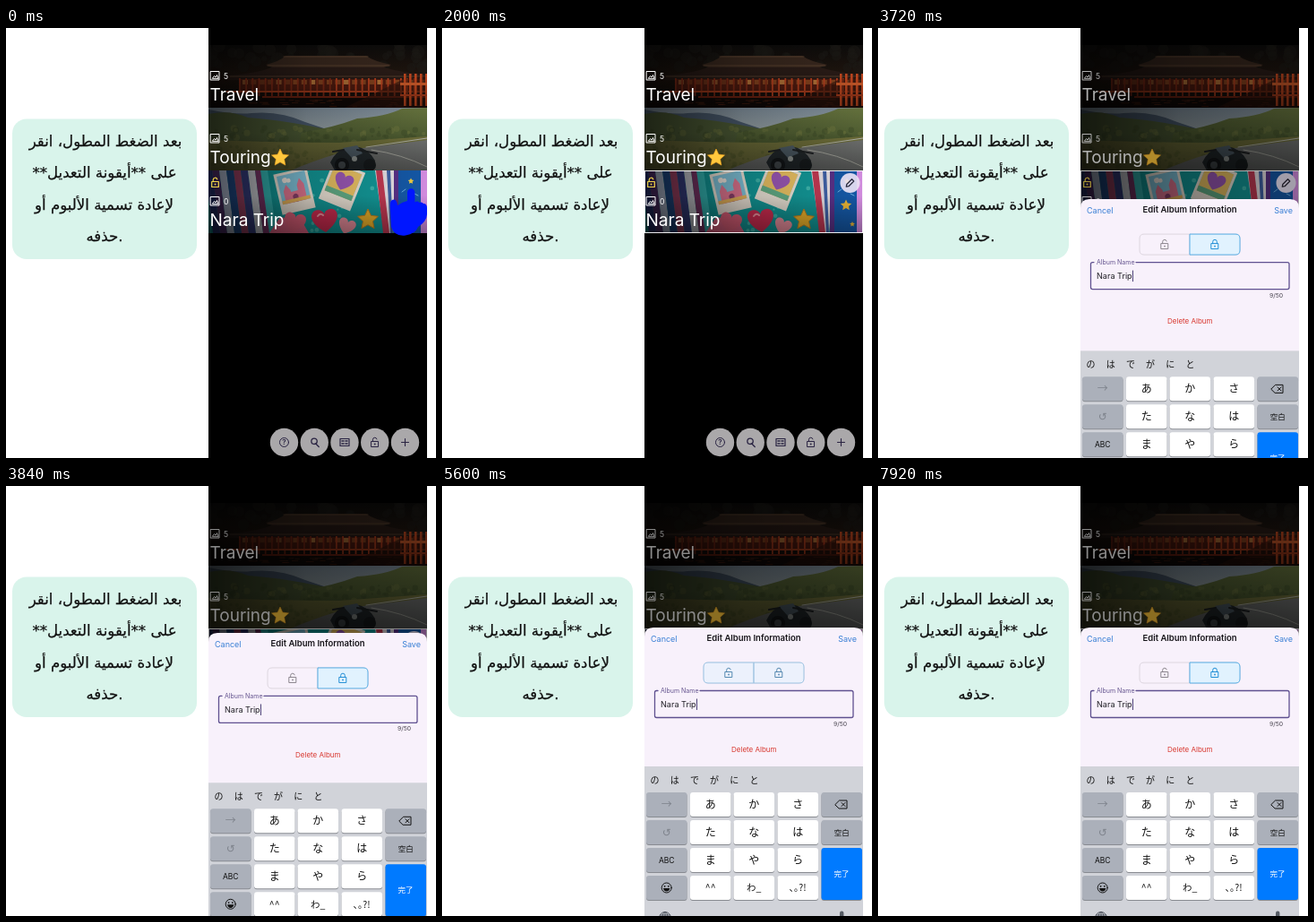
An HTML page that plays this animation: 480 px wide and 480 px high, repeating every 8000 ms.

```html
<!DOCTYPE html>
<html lang="ar">
<head>
<meta charset="utf-8">
<title>Album editing guide</title>
<style>
html, body { margin: 0; width: 100%; height: 100%; overflow: hidden; background: #fff; }
svg { display: block; width: 480px; height: 480px; font-family: Inter, Roboto, sans-serif; }
.note { font: 16.6px "DejaVu Sans", "Noto Sans", sans-serif; fill: #111; stroke: #111; stroke-width: .25; text-anchor: middle; }
.jp { font-family: "Noto Sans CJK JP", "Noto Sans CJK", "Noto Sans", sans-serif; }
.mid { text-anchor: middle; }
.line { fill: none; stroke-linecap: round; stroke-linejoin: round; }
</style>
</head>
<body>
<svg id="stage" viewBox="0 0 480 480" xmlns="http://www.w3.org/2000/svg"></svg>
<script>
const LOOP = 8000;
let seed = 11;
const rnd = () => (seed = (seed * 16807) % 2147483647) / 2147483647;
const many = (n, f) => Array.from({ length: n }, (_, i) => f(i)).join('');
const rect = (x, y, w, h, fill, more = '') =>
  `<rect x="${x}" y="${y}" width="${w}" height="${h}" fill="${fill}" ${more}/>`;
const path = (d, fill, more = '') => `<path d="${d}" fill="${fill}" ${more}/>`;
const line = (d, color, w = 1, more = '') =>
  `<path class="line" d="${d}" stroke="${color}" stroke-width="${w}" ${more}/>`;
const circle = (x, y, r, fill, more = '') =>
  `<circle cx="${x}" cy="${y}" r="${r}" fill="${fill}" ${more}/>`;
const text = (x, y, size, fill, s, more = '') =>
  `<text x="${x}" y="${y}" font-size="${size}" fill="${fill}" ${more}>${s}</text>`;
const group = (more, s) => `<g ${more}>${s}</g>`;

function star(x, y, r, fill, more = '') {
  const pts = many(10, i => {
    const a = i * Math.PI / 5 - Math.PI / 2, q = i % 2 ? r * .48 : r;
    return `${(x + q * Math.cos(a)).toFixed(1)},${(y + q * Math.sin(a)).toFixed(1)} `;
  });
  return `<polygon points="${pts}" fill="${fill}" stroke-linejoin="round" ${more}/>`;
}
const heart = (x, y, s, fill, turn = 0) => path(
  'M0 8C-14 -1 -10 -9 -5 -9C-2 -9 0 -7 0 -5C0 -7 2 -9 5 -9C10 -9 14 -1 0 8Z', fill,
  `transform="translate(${x} ${y}) rotate(${turn}) scale(${s})"`);

function lock(x, y, color, open, w = 1) {
  const shackle = open ? 'M-2.3 -1V-3.2A2.3 2.3 0 0 1 2.2 -3.6' : 'M-2.3 -1V-3A2.3 2.3 0 0 1 2.3 -3V-1';
  return group(`transform="translate(${x} ${y})"`,
    line(`M-3.8 -1H3.8V5H-3.8Z${shackle}`, color, w) + circle(0, 2, .9, color));
}

const gradient = (id, stops, dir = 'x2="0" y2="1"') => `<linearGradient id="${id}" x1="0" y1="0" ${dir}>` +
  stops.map(([o, c, a = 1]) => `<stop offset="${o}" stop-color="${c}" stop-opacity="${a}"/>`).join('') +
  '</linearGradient>';

const defs = '<defs>' +
  gradient('night', [[0, '#0d0c0b'], [.5, '#21160f'], [1, '#120b08']]) +
  gradient('sky', [[0, '#7c8b98'], [.5, '#a0aaa9']]) +
  gradient('hill', [[0, '#66733e'], [1, '#41502a']]) +
  gradient('shade', [[0, '#000', .6], [.45, '#000', .22], [1, '#000', .02]], 'x2="1" y2="0"') +
  gradient('low', [[.4, '#000', 0], [1, '#000', .35]]) +
  '<clipPath id="row"><rect width="244" height="70"/></clipPath>' +
  '<clipPath id="phone"><rect x="226" width="244" height="480"/></clipPath></defs>';

function shrine() {
  return rect(0, 0, 244, 70, 'url(#night)') +
    many(45, () => circle(rnd() * 244, rnd() * 25, 3 + rnd() * 5, '#1b1a15', 'opacity=".5"')) +
    path('M64 22Q80 18 86 12H176Q184 18 204 22L190 27H76Z', '#39281e') +
    path('M20 34Q54 32 70 25H196Q216 31 244 33V39H20Z', '#2a1c17') +
    line('M84 13H178M66 23H202M24 35H244', '#58402e', 1) +
    rect(34, 38, 210, 14, '#571d10') +
    many(22, i => rect(38 + i * 9.4, 39, 6, 5, i % 4 ? '#9a5124' : '#d58d45', `opacity="${i < 6 ? .5 : .85}"`)) +
    many(30, i => rect(34 + i * 7.2, 37, 1.8, 20, i > 14 ? '#c54521' : '#8e2f18')) +
    rect(20, 51, 224, 2, '#b9431f') + rect(60, 57, 184, 2, '#852813') +
    rect(0, 60, 244, 10, '#140b08') +
    many(34, () => rect(40 + rnd() * 200, 60 + rnd() * 8, 3 + rnd() * 7, .8, '#74301a', 'opacity=".6"')) +
    path('M152 70L218 38L244 34V70Z', '#35150d', 'opacity=".6"') +
    many(5, i => rect(218 + i * 6, 32, 2.6, 36, '#c94a20')) +
    rect(214, 42, 30, 3, '#d7602c') + rect(214, 55, 30, 2, '#b2401d');
}

function road() {
  return rect(0, 0, 244, 70, 'url(#sky)') +
    path('M0 2Q30 8 48 6Q80 3 108 16L150 30V60H0Z', '#48586a') +
    path('M0 7Q24 2 44 11Q88 14 150 28V70H0Z', '#4c5a35') +
    path('M104 28Q140 22 166 12Q198 10 216 1L244 0V50H98Z', 'url(#hill)') +
    many(110, () => circle(rnd() * 244, 22 + rnd() * 24, 1 + rnd() * 3, rnd() > .5 ? '#3e4b27' : '#6d753d', 'opacity=".5"')) +
    path('M0 36Q80 39 146 39L244 32V70H0Z', '#71713b') +
    many(60, () => circle(rnd() * 150, 42 + rnd() * 26, 1 + rnd() * 2, '#585f2e', 'opacity=".5"')) +
    path('M92 70Q144 48 180 44L244 36V70Z', '#737573') +
    line('M182 47Q216 52 244 66M176 44L244 34', '#b7b8ae', 1) +
    path('M136 61Q143 47 152 46L164 43Q178 45 186 59L184 70H141Z', '#252c2f') +
    path('M150 45L166 42L172 51L160 56Z', '#52616b') +
    line('M139 49L151 47M166 47L188 51', '#202426', 2) +
    circle(149, 64, 8, '#15191b') + circle(180, 64, 7, '#1b2022') +
    circle(149, 64, 4, '#4c5357') + circle(163, 57, 3, '#a1a7a3');
}

function polaroid(x, y, turn, inner) {
  return group(`transform="translate(${x} ${y}) rotate(${turn})"`,
    rect(-19, -23, 38, 46, '#f2e9dc') + rect(-16, -20, 32, 32, '#83c8df') + inner);
}

function scrapbook() {
  const spines = ['#293477', '#553271', '#bac5dc', '#214d8c', '#a64569', '#383f82', '#d0d1d8', '#7b3568'];
  const castle = path('M-12 12V-2L-8 -9L-4 -2V0H4V-6L8 -13L12 -6V12Z', '#e77994') +
    path('M-3 12V5Q0 1 3 5V12Z', '#8e416d') + rect(-16, 8, 32, 4, '#edb85c') +
    circle(-8, -14, 3, '#f7eee5') + circle(-4, -13, 2.4, '#f7eee5');
  const balloon = rect(-16, -20, 32, 32, '#f1c766') + heart(0, -4, 1.1, '#a05bbb') +
    rect(-16, 6, 32, 6, '#65b18a');
  return rect(0, 0, 244, 70, '#139b9b') +
    many(8, i => path(`M${i * 8 - 4} 0H${i * 8 + 4}L${i * 8 + 13} 70H${i * 8 + 5}Z`, spines[i])) +
    path('M58 0H66L76 70H68Z', '#35bbb9') +
    many(18, () => circle(80 + rnd() * 110, rnd() * 70, 1 + rnd() * 2, '#54c9bc', 'opacity=".7"')) +
    path('M68 70L80 52L104 56L112 70Z', '#e66686') +
    polaroid(96, 23, -13, castle) + polaroid(149, 17, 22, balloon) +
    heart(130, 57, 1.5, '#d92f55', -5) + heart(96, 59, 1.25, '#eb6681', 12) + heart(154, 63, 1, '#f495a4', 20) +
    line('M122 51Q125 47 128 50', '#ff9eac', 2) +
    star(178, 55, 12, '#f3b72b', 'stroke="#ca851d" stroke-width="1"') +
    path('M186 0H212L206 70H196Z', '#e8e2e6') +
    path('M187 0H194L202 70H195Z', '#c43a54') +
    path('M199 0H203L206 70H203Z', '#3f62a8') + path('M207 0H214V70H207Z', '#5a3189') +
    rect(212, 0, 27, 70, '#1559a8') + rect(237, 0, 7, 70, '#d58ee2') +
    star(226, 12, 3.5, '#f2ce42') + star(225, 39, 6.5, '#f0ba37') + star(232, 60, 3, '#f0ba37') +
    line('M216 24L220 21M230 26L234 28', '#70b3e4', 1);
}

function row(y, art, title, count) {
  const icon = line('M2.5 29.5H12V39H2.5ZM4.5 37L6.5 34.5L8 36L9.5 33.5L11 37Z', '#fff', 1);
  return group(`transform="translate(226 ${y})"`,
    group('clip-path="url(#row)"', art + rect(0, 0, 244, 70, 'url(#shade)') + rect(0, 0, 244, 70, 'url(#low)')) +
    icon + text(17, 37.5, 8.5, '#fff', count) +
    text(1.5, 62, 19, '#fff', title));
}

function buttons() {
  const ink = '#292342';
  const icons = [
    `<circle class="line" r="5" stroke="${ink}"/>` + text(0, 2.8, 8, ink, '?', 'class="mid" font-weight="600"'),
    line('M2 2L5 5M3 -1.2A3.2 3.2 0 1 1 -3.4 -1.2A3.2 3.2 0 1 1 3 -1.2', ink, 1.3),
    line('M-5 -4H5V4H-5Z', ink, 1.2) + line('M-3 -1.5H-1M1 -1.5H3M-3 1.5H-1M1 1.5H3', ink, 1.6),
    lock(0, 0, ink, true),
    line('M-4 0H4M0 -4V4', ink, 1.1)
  ];
  return icons.map((s, i) => group(`transform="translate(${310.5 + i * 33.75} 462.5)"`,
    circle(0, 0, 15.7, '#aaa8aa') + s)).join('');
}

function keyboard() {
  const xs = [228, 277, 325.5, 374.5, 423.5];
  const keys = [
    ['→', 'あ', 'か', 'さ', ''],
    ['↺', 'た', 'な', 'は', '空白'],
    ['ABC', 'ま', 'や', 'ら', ''],
    ['', '^^', 'わ_', '､｡?!', '']
  ];
  const key = (x, y, h, fill) => rect(x, y + 1, 45.5, h, '#888b91', 'rx="3"') + rect(x, y, 45.5, h, fill, 'rx="3"');
  let s = rect(226, 313, 244, 230, '#d1d3d9');
  [...'のはでがにと'].forEach((c, i) => s += text(237.5 + i * 22.2, 332, 10, '#111', c, 'class="jp mid"'));
  keys.forEach((cells, r) => cells.forEach((c, k) => {
    if (k === 4 && r > 1) return;
    const y = 342 + r * 31, side = k === 0 || k === 4;
    const size = side ? (k === 4 ? 8.5 : c === 'ABC' ? 8.5 : 12) : r === 3 ? 10.5 : 12;
    const ink = k === 0 && r < 2 ? '#7f848d' : '#111';
    s += key(xs[k], y, 27, side ? '#abb0ba' : '#fff') +
      text(xs[k] + 22.7, y + 13.5 + size * .36, size, ink, c, c === 'ABC' ? 'class="mid"' : 'class="jp mid"');
  }));
  s += key(423.5, 404, 58, '#007aff') + text(446, 436, 8.5, '#fff', '完了', 'class="jp mid"');
  s += line('M439 355.5L443.5 351H452V360H443.5ZM446 353.5L450 357.5M450 353.5L446 357.5', '#111', 1);
  s += `<circle class="line" cx="250.7" cy="448.5" r="5.5" stroke="#111"/>` +
    circle(248.6, 446.8, .9, '#111') + circle(252.8, 446.8, .9, '#111') +
    path('M247 449H254.4Q253.6 452.6 250.7 452.6T247 449Z', '#111');
  s += line('M242.5 482A6.5 6.5 0 0 1 255.5 482M246 482Q246 476 249 475.5Q252 476 252 482M249 475.5V482M243.5 479H254.5', '#444b55', .9);
  s += rect(444, 474.5, 4.4, 9, '#555b64', 'rx="2.2"');
  return s;
}

function choice(id, x, side) {
  const left = side === 'left';
  const shape = left ? `M${x + 56} 197H${x + 5}Q${x} 197 ${x} 202V215Q${x} 220 ${x + 5} 220H${x + 56}Z`
    : `M${x} 197H${x + 51}Q${x + 56} 197 ${x + 56} 202V215Q${x + 56} 220 ${x + 51} 220H${x}Z`;
  return path(shape, 'none', 'stroke="#ddd6df" stroke-width="1"') + lock(x + 28, 208.5, '#8b858d', left) +
    group(`id="${id}"`, path(shape, '#e1f2fe', 'stroke="#58aee5" stroke-width="1"') + lock(x + 28, 208.5, '#238fd6', left));
}

function sheet() {
  return path('M226 560V168Q226 158 236 158H460Q470 158 470 168V560Z', '#f8f1fb') +
    text(233, 174, 9, '#397fd5', 'Cancel') +
    text(348, 173, 9.5, '#17151a', 'Edit Album Information', 'class="mid" font-weight="600"') +
    text(463, 174, 9, '#397fd5', 'Save', 'text-anchor="end"') +
    choice('open', 292, 'left') + choice('closed', 348, 'right') +
    line('M241 228.5H239.5Q237.5 228.5 237.5 230.5V256.5Q237.5 258.5 239.5 258.5H457Q459 258.5 459 256.5V230.5Q459 228.5 457 228.5H288', '#5f5090', 1.3) +
    text(244, 231.3, 7, '#65558f', 'Album Name') +
    text(244, 247, 9.1, '#222027', 'Nara Trip') +
    rect(284, 237.5, 1, 12.5, '#4c4177') +
    text(452, 267.5, 6.8, '#49454f', '9/50', 'text-anchor="end"') +
    text(348.3, 297.3, 8, '#d8382f', 'Delete Album', 'class="mid"');
}

const note = [
  ['بعد الضغط المطول، انقر', 111, 'rtl'],
  ['على **أيقونة التعديل**', 110, 'rtl'],
  ['لإعادة تسمية الألبوم أو', 109.5, 'rtl'],
  ['حذفه.', 110, 'ltr']
].map(([s, x, dir], i) => `<text class="note" x="${x}" y="${132 + i * 35.3}" direction="${dir}">${s}</text>`).join('');

const hand = path('M448 183.5A4.2 4.2 0 0 1 456.4 183.5V194.5Q459 192.5 461.5 195Q464 193.5 466 196Q470 196 470 201V208Q469.5 216 460 222Q457 230 446 231.5Q433 233 430 222L428.7 198Q428.5 191.5 433 191.5Q436.5 192 437 198Q443 194 448 193Z', '#0016ff');

const selected = '<rect x="226.5" y="159.5" width="243" height="69" fill="none" stroke="#fff"/>' +
  circle(455.5, 173, 11, '#ebe3f5') +
  line('M451.3 177.2L451.8 174.5L457.5 168.8L459.7 171L454 176.7Z', '#2c2836', 1.3);

document.getElementById('stage').innerHTML = defs +
  rect(0, 0, 480, 480, '#fff') + rect(7, 101.5, 206, 156.5, '#d9f4eb', 'rx="16"') + note +
  group('clip-path="url(#phone)"',
    rect(226, 0, 244, 480, '#000') +
    row(19, shrine(), 'Travel', '5') + row(89, road(), 'Touring', '5') +
    star(306, 145, 10, '#ffc83d', 'stroke="#f5a623" stroke-width=".6"') +
    row(159, scrapbook(), 'Nara Trip', '0') + lock(233.5, 172.5, '#f1d54b', true, 1.2) +
    group('id="selected"', selected) + buttons() +
    rect(226, 0, 244, 480, '#000', 'id="dim"') +
    group('id="sheet"', sheet()) + group('id="keys"', keyboard())) +
  group('id="hand"', hand);

const el = id => document.getElementById(id);
const parts = Object.fromEntries(['hand', 'selected', 'dim', 'sheet', 'keys', 'open', 'closed'].map(id => [id, el(id)]));
const clamp = v => Math.max(0, Math.min(1, v));

// Piecewise track of [time, value] with eased segments
function track(points, t) {
  const i = points.findIndex(p => p[0] > t);
  if (i < 0) return points[points.length - 1][1];
  if (!i) return points[0][1];
  const [[a, from], [b, to]] = [points[i - 1], points[i]];
  return from + (to - from) * (1 - Math.cos(Math.PI * (t - a) / (b - a))) / 2;
}
const PRESS = [[520, 1], [800, 1.24], [1080, .97], [1320, 1]];
const SELECT = [[1840, 0], [2040, 1]];
const UNLOCK = [[5500, 0], [5700, 1], [7260, 0.999], [7460, 0]];
const settle = (t, far, tau) => t < 0 ? far : t > 800 ? 0 : far * Math.exp(-t / tau);

function draw(t) {
  const s = track(PRESS, t), rise = t - 3560, free = track(UNLOCK, t);
  parts.hand.setAttribute('transform', `translate(449 205.5) scale(${s}) translate(-449 -205.5)`);
  parts.hand.setAttribute('opacity', clamp((1440 - t) / 100));
  parts.selected.setAttribute('opacity', track(SELECT, t));
  parts.dim.setAttribute('opacity', .46 * clamp(rise / 240));
  parts.sheet.setAttribute('transform', `translate(0 ${settle(rise, 330, 70)})`);
  parts.keys.setAttribute('transform', `translate(0 ${settle(rise, 170, 126)})`);
  parts.open.setAttribute('opacity', free);
  parts.closed.setAttribute('opacity', 1 - free);
}

const start = performance.now();
function tick() {
  draw((performance.now() - start) % LOOP);
  requestAnimationFrame(tick);
}
draw(0);
requestAnimationFrame(tick);
</script>
</body>
</html>
```
